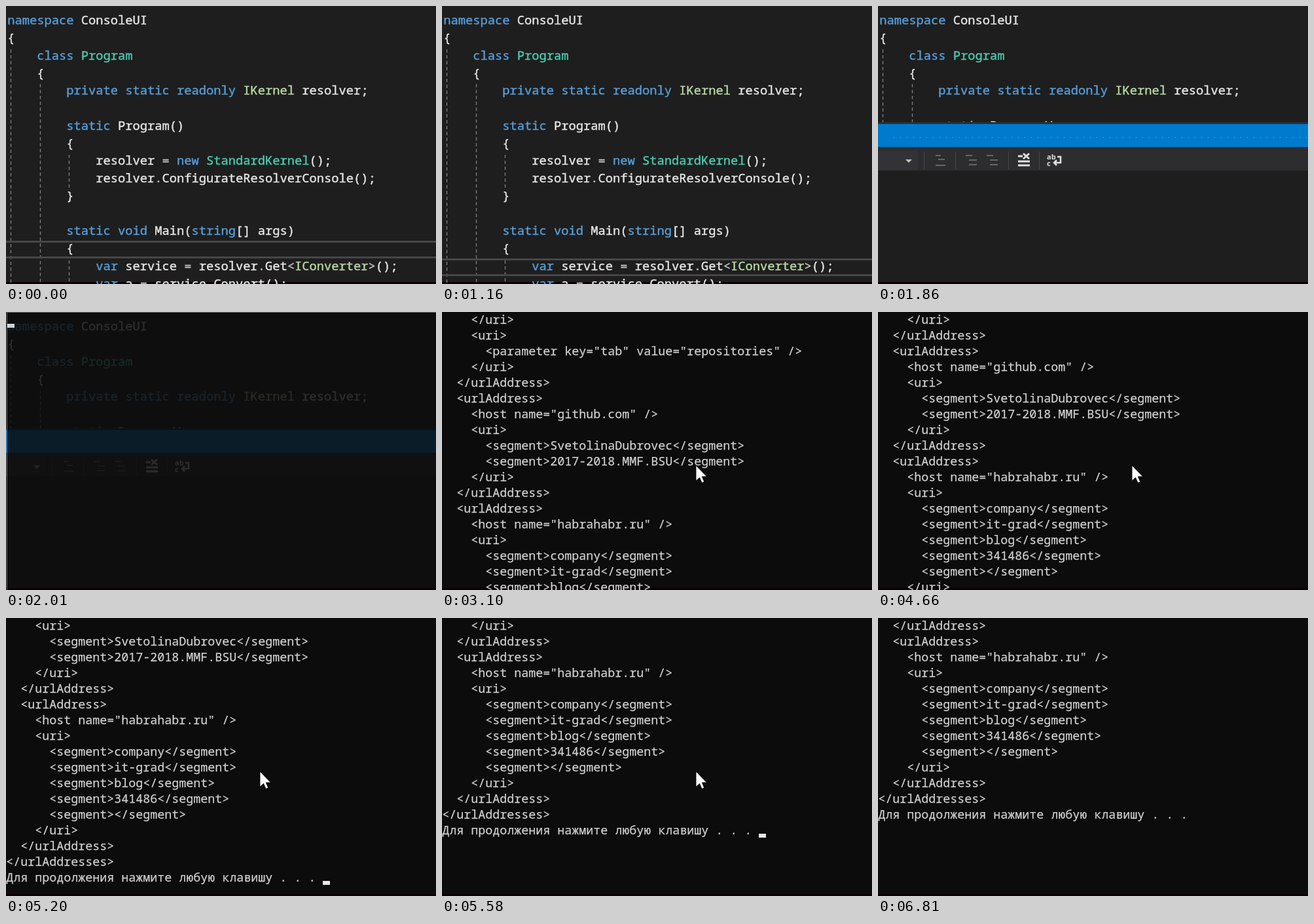
Recreate the animation shown at these times as an HTML page. Size 657x424 px, loop 7040 ms.

```html
<!DOCTYPE html>
<html lang="en">
<head>
<meta charset="utf-8">
<title>Console run</title>
<style>
  html, body { margin: 0; width: 100%; height: 100%; overflow: hidden; background: #1e1e1e; }
  svg { display: block; width: 657px; height: 424px; }
  text { white-space: pre; font-family: "Noto Sans Mono", "DejaVu Sans Mono", monospace; font-variant-ligatures: none; }
  #code text { font-size: 18.75px; }
  #code tspan { fill: var(--ink, #e6e6e6); stroke: var(--ink, #e6e6e6); stroke-width: .45px; }
  #rows text { font-size: 18.333px; fill: #d0d0d0; stroke: #d0d0d0; stroke-width: .25px; }
  #panel text { font: 700 11px "Open Sans", sans-serif; fill: #e0e0e0; }
  .key { --ink: #569cd6; }
  .type { --ink: #4ec9b0; }
  .face { --ink: #b8d7a3; }
  .op { --ink: #c0c0c0; }
  .guide { stroke: #808080; stroke-width: 1.3; stroke-dasharray: 5 4; }
  .strip { fill: #0c0006; }
</style>
</head>
<body>
<svg viewBox="0 0 657 424">
  <g id="editor">
    <rect width="657" height="424" fill="#1e1e1e"/>
    <rect class="strip" y="421" width="657" height="3"/>
    <path class="guide" d="M7.5 66V424M52.5 119V424M96.5 227V280M96.5 388V424"/>
    <rect id="current" x="-2" width="661" height="24" fill="none" stroke="#464646" stroke-width="3"/>
    <g id="code"></g>
    <rect id="caret" x="598" y="384" width="2" height="26" fill="#dcdcdc"/>
  </g>
  <g id="panel">
    <rect y="177" width="657" height="247" fill="#1e1e1e"/>
    <rect y="177" width="657" height="3" fill="#2d2d30"/>
    <rect y="180" width="657" height="35" fill="#007acc"/>
    <path d="M24 200.5H657" stroke="#59a8de" stroke-dasharray="1 9"/>
    <rect y="215" width="657" height="36" fill="#2d2d30"/>
    <rect x="-1" y="221" width="62" height="29" fill="#333337"/>
    <path d="M42 234h10l-5 5z" fill="#c0c0c0"/>
    <path d="M70.5 222v27M118.5 222v27M199.5 222v27M246.5 222v27" stroke="#46464a"/>
    <path d="M88 228h8M92 234h10M88 243h15M134 228h10M139 235h12M139 242h12M166 228h10M171 235h12M171 242h12"
          stroke="#656565" stroke-width="2" fill="none"/>
    <path d="M214 229h7M214 237h18M214 243h18M222 225l9 8M231 225l-9 8" stroke="#e0e0e0" stroke-width="3"/>
    <text x="258" y="234">ab</text>
    <text x="258" y="244">c</text>
    <path d="M274 230h5v9h-10M273 235l-4 4l4 4" stroke="#e0e0e0" stroke-width="2.5" fill="none"/>
    <rect class="strip" y="421" width="657" height="3"/>
  </g>
  <g id="console">
    <rect id="back" width="657" height="424" fill="#0c0c0c"/>
    <rect class="strip" y="421" width="657" height="3"/>
    <path id="edge" d="M1.5 424V.5H657" fill="none" stroke="#707070"/>
    <g id="rows"></g>
    <rect id="block" width="11" height="6" fill="#e8e8e8"/>
  </g>
  <path id="mouse" d="M0 0V23.5L5.5 18.5L9 26.5L12.7 25L9.3 17H16.5Z" fill="#fff" stroke="#000" stroke-width=".8"/>
</svg>
<script>
const LOOP = 7040;
const $ = id => document.getElementById(id);
const show = (node, on) => node.setAttribute("visibility", on ? "visible" : "hidden");
const set = (node, attrs) => { for (const k in attrs) node.setAttribute(k, attrs[k]); };

function svg(tag, parent, attrs, text = "") {
  const node = document.createElementNS("http://www.w3.org/2000/svg", tag);
  set(node, attrs);
  node.textContent = text;
  parent.append(node);
  return node;
}

const source = `namespace ConsoleUI
{
    class Program
    {
        private static readonly IKernel resolver;

        static Program()
        {
            resolver = new StandardKernel();
            resolver.ConfigurateResolverConsole();
        }

        static void Main(string[] args)
        {
            var service = resolver.Get<IConverter>();
            var a = service.Convert();`;

const tokens = [
  ["key", /^(namespace|class|private|static|readonly|new|void|string|var)$/],
  ["type", /^(Program|StandardKernel)$/],
  ["face", /^(IKernel|IConverter)$/],
  ["op", /^[=.<>]$/]
];

source.split("\n").forEach((line, i) => {
  const row = svg("text", $("code"), { x: 2.2, y: Math.floor(28.9 + 26.75 * i) });
  for (const part of line.split(/(\w+|[=.<>])/)) {
    if (!part) continue;
    const hit = tokens.find(([, re]) => re.test(part));
    const plain = part === "Program" && line.includes("Program(");
    svg("tspan", row, { class: hit && !plain ? hit[0] : "" }, part);
  }
});

const segment = s => `      <segment>${s}</segment>`;
const host = s => `    <host name="${s}" />`;
const uri = rows => ["    <uri>", ...rows, "    </uri>"];
const address = (name, parts) =>
  ["  <urlAddress>", host(name), ...uri(parts.map(segment)), "  </urlAddress>"];

const output = [
  "    </uri>",
  ...uri(['      <parameter key="tab" value="repositories" />']),
  "  </urlAddress>",
  ...address("github.com", ["SvetolinaDubrovec", "2017-2018.MMF.BSU"]),
  ...address("habrahabr.ru", ["company", "it-grad", "blog", "341486", ""]),
  "</urlAddresses>",
  "Для продолжения нажмите любую клавишу . . . "
];
output.forEach((line, i) => svg("text", $("rows"), { x: 0.3, y: 18 + 24 * i }, line));

// Steps: [start time, value...], each held until the next
const fade = [[0, 0], [1940, .5], [2010, .85], [2090, .95], [2170, 1]];
const scrollTimes = [4260, 4490, 4660, 4890, 4990, 5100, 5200, 5350, 5430, 5580, 5730];
const pointer = [
  [2240, 579, 284], [2870, 530, 271], [2950, 468, 255], [3020, 412, 240], [3100, 388, 234],
  [6040, 420, 268], [6120, 490, 337], [6190, 557, 404], [6270, 600, 450]
];
const at = (steps, t) => steps.filter(s => s[0] <= t).pop();
const within = (t, a, b) => t >= a && t < b;

function draw(t) {
  set($("current"), { y: t < 610 ? 359.5 : 386.5 });
  show($("caret"), within(t, 610, 1160));
  show($("panel"), t >= 1860);

  const running = t >= 2240;
  const line = scrollTimes.filter(s => s <= t).length;
  set($("console"), { opacity: at(fade, t)[1] });
  set($("back"), { x: running ? 0 : 2 });
  show($("edge"), !running);
  show($("rows"), running);
  set($("rows"), { transform: `translate(0 ${-24 * line})` });

  const blink = t < 6040 || within(t, 6580, 6810);
  show($("block"), blink);
  set($("block"), running ? { x: 484, y: 569 - 24 * line } : { x: 2, y: 18 });

  const p = at(pointer, t);
  show($("mouse"), !!p);
  if (p) set($("mouse"), { transform: `translate(${p[1]} ${p[2]})` });
}

const start = performance.now();
function tick() {
  draw((performance.now() - start) % LOOP);
  requestAnimationFrame(tick);
}
tick();
</script>
</body>
</html>
```
